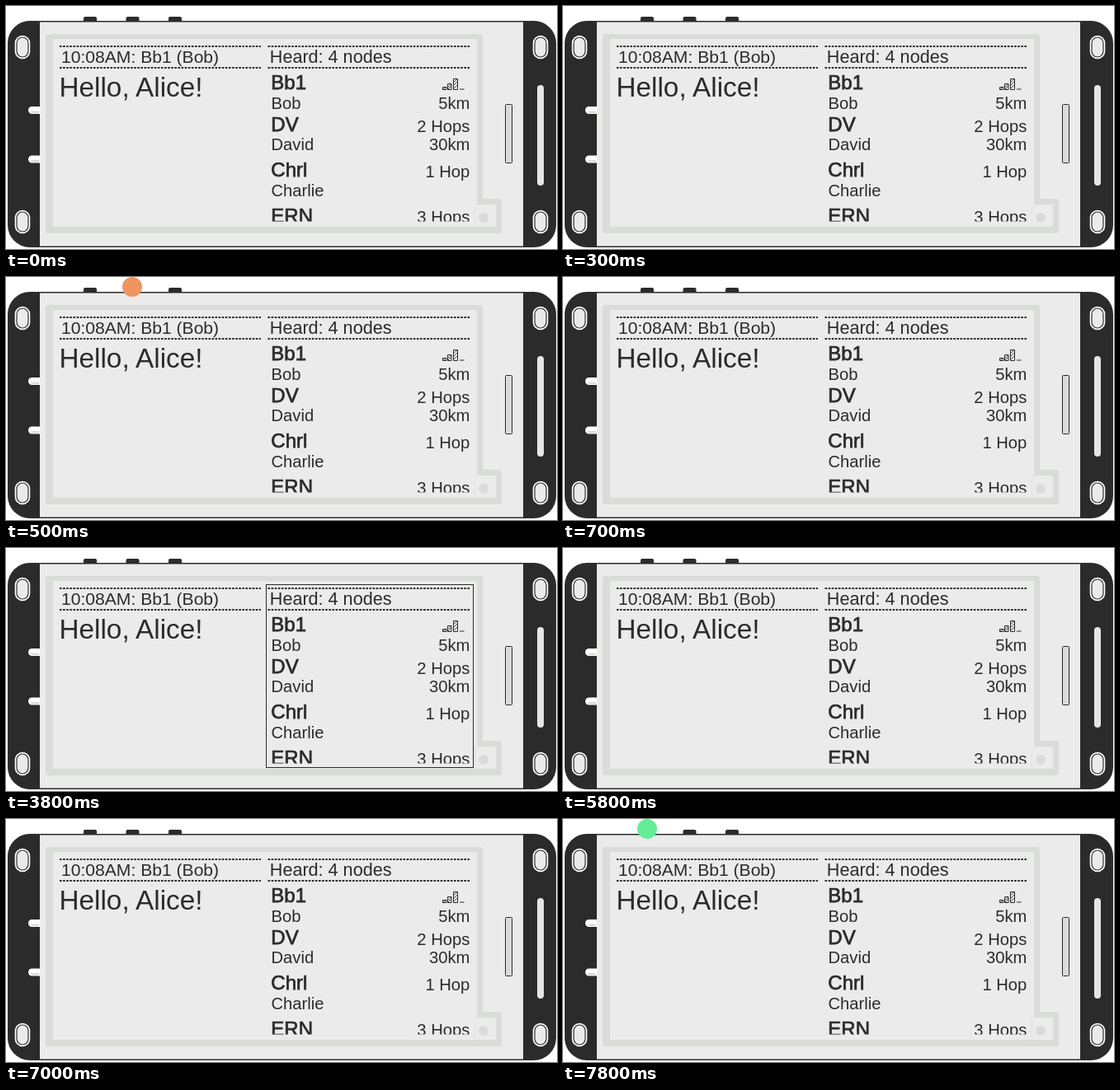
These frames come from a looping animation (668 by 295 pixels, 8 s). An HTML page:

```html
<!DOCTYPE html>
<html lang="en">
<head>
<meta charset="utf-8">
<title>Handheld node list</title>
<style>
  html, body { margin: 0; width: 100%; height: 100%; overflow: hidden; background: #fff; }
  svg { display: block; width: 100%; height: 100%; }
  text { font-family: "Liberation Sans", Arial, Helvetica, sans-serif; fill: #2b2b2b; }
  .name { font-size: 24px; stroke: #2b2b2b; stroke-width: .75px; }
  .info { font-size: 20.2px; }
  .right { text-anchor: end; }
  .dots { stroke: #2b2b2b; stroke-width: 2; stroke-dasharray: 2.6 1.5; }
</style>
</head>
<body>
<svg id="stage" viewBox="0 0 668 295" xmlns="http://www.w3.org/2000/svg">
  <defs>
    <clipPath id="screen"><rect x="57" y="40" width="511" height="221.5"/></clipPath>
    <g id="hole">
      <rect x="-9.3" y="-14.3" width="18.6" height="28.6" rx="9.3" fill="#fff"/>
      <rect x="-7" y="-12" width="14" height="24" rx="7" fill="#ebebeb" stroke="#2b2b2b" stroke-width="1.2"/>
    </g>
    <rect id="button" x="-8" y="13" width="16" height="8" rx="2" fill="#2b2b2b"/>
    <g id="pin">
      <path d="M41 0H31.500a4.500 4.500 0 0 0 0 9H41Z" fill="#fff"/>
      <path d="M40 5.500H30a3 3 0 0 0 2 2.500H40Z" fill="#d9dcd8"/>
    </g>
  </defs>

  <use href="#button" x="102"/>
  <use href="#button" x="153.500"/>
  <use href="#button" x="205"/>
  <rect x="2" y="18" width="665" height="275" rx="27" fill="#2b2b2b"/>
  <rect x="41" y="19.500" width="586" height="272" fill="#ebebeb"/>
  <use href="#hole" x="20" y="50"/>
  <use href="#hole" x="20" y="262"/>
  <use href="#hole" x="648" y="50"/>
  <use href="#hole" x="648" y="262"/>
  <use href="#pin" y="122"/>
  <use href="#pin" y="181.500"/>
  <rect x="644" y="96" width="8" height="122" rx="4" fill="#e6e6e6"/>
  <rect x="605.500" y="119.500" width="8" height="71" rx="1" fill="#d9dcd8" stroke="#2b2b2b"/>

  <path fill="#d9dcd8" fill-rule="evenodd"
    d="M51 34H575q3 0 3 3V234H598q3 0 3 3V273q0 3-3 3H51q-3 0-3-3V37q0-3 3-3Z
       M57 40V268H594V241H571V40Z"/>
  <path d="M568.500 241V268" stroke="#e0e2df"/>
  <circle cx="579" cy="257" r="6" fill="#d9dcd8"/>

  <g id="content" clip-path="url(#screen)">
    <path class="dots" d="M65 49H309M65 75H309M317.500 49H563M317.500 75H563"/>
    <text x="67" y="68.500" font-size="21.1">10:08AM: Bb1 (Bob)</text>
    <text x="319.800" y="69" font-size="21.6">Heard: 4 nodes</text>
    <text x="64.500" y="109.500" font-size="33.3">Hello, Alice!</text>
    <g fill="none" stroke="#2b2b2b">
      <path d="M529.500 98.500h4.500v3h-4.500ZM535.500 94.500h4.500v7h-4.500ZM542.500 88.500h5v13h-5ZM550 101h5.500"/>
      <path stroke-width=".8" d="M530 101l3-2M536 98l4-3M536 101l4-4M543 92l4-3M543 96l4-4M543 100l4-4"/>
    </g>
  </g>

  <rect id="focus" x="315.500" y="44.500" width="251" height="222" fill="none" stroke="#2b2b2b"/>
  <circle id="select" cx="153" cy="12" r="12" fill="#ee9560"/>
  <circle id="back" cx="102" cy="12" r="12" fill="#64ed96"/>
</svg>
<script>
  const LOOP = 8000;
  const byId = id => document.getElementById(id);
  const content = byId("content");

  function label(value, x, y, cls) {
    const node = document.createElementNS("http://www.w3.org/2000/svg", "text");
    node.setAttribute("x", x);
    node.setAttribute("y", y);
    node.setAttribute("class", cls);
    node.textContent = value;
    content.append(node);
  }

  // short name, full name, hops, distance, two baselines
  const nodes = [
    ["Bb1", "Bob", "", "5km", 101, 124.5],
    ["DV", "David", "2 Hops", "30km", 152, 175],
    ["Chrl", "Charlie", "1 Hop", "", 207, 231],
    ["ERN", "", "3 Hops", "", 262.5, 285]
  ];
  for (const [short, full, hops, distance, top, low] of nodes) {
    label(short, 321.3, top, "name");
    label(full, 321.5, low, "info");
    label(hops, 562.3, top + 0.8, "info right");
    label(distance, 562.3, low, "info right");
  }

  // visible spans in ms
  const spans = { select: [500, 700], focus: [800, 5800], back: [7800, LOOP] };
  const parts = Object.entries(spans).map(([id, span]) => [byId(id), ...span]);

  function draw(t) {
    for (const [part, from, to] of parts) {
      part.setAttribute("visibility", t >= from && t < to ? "visible" : "hidden");
    }
  }

  const start = performance.now();
  function tick() {
    draw((performance.now() - start) % LOOP);
    requestAnimationFrame(tick);
  }
  tick();
</script>
</body>
</html>
```
